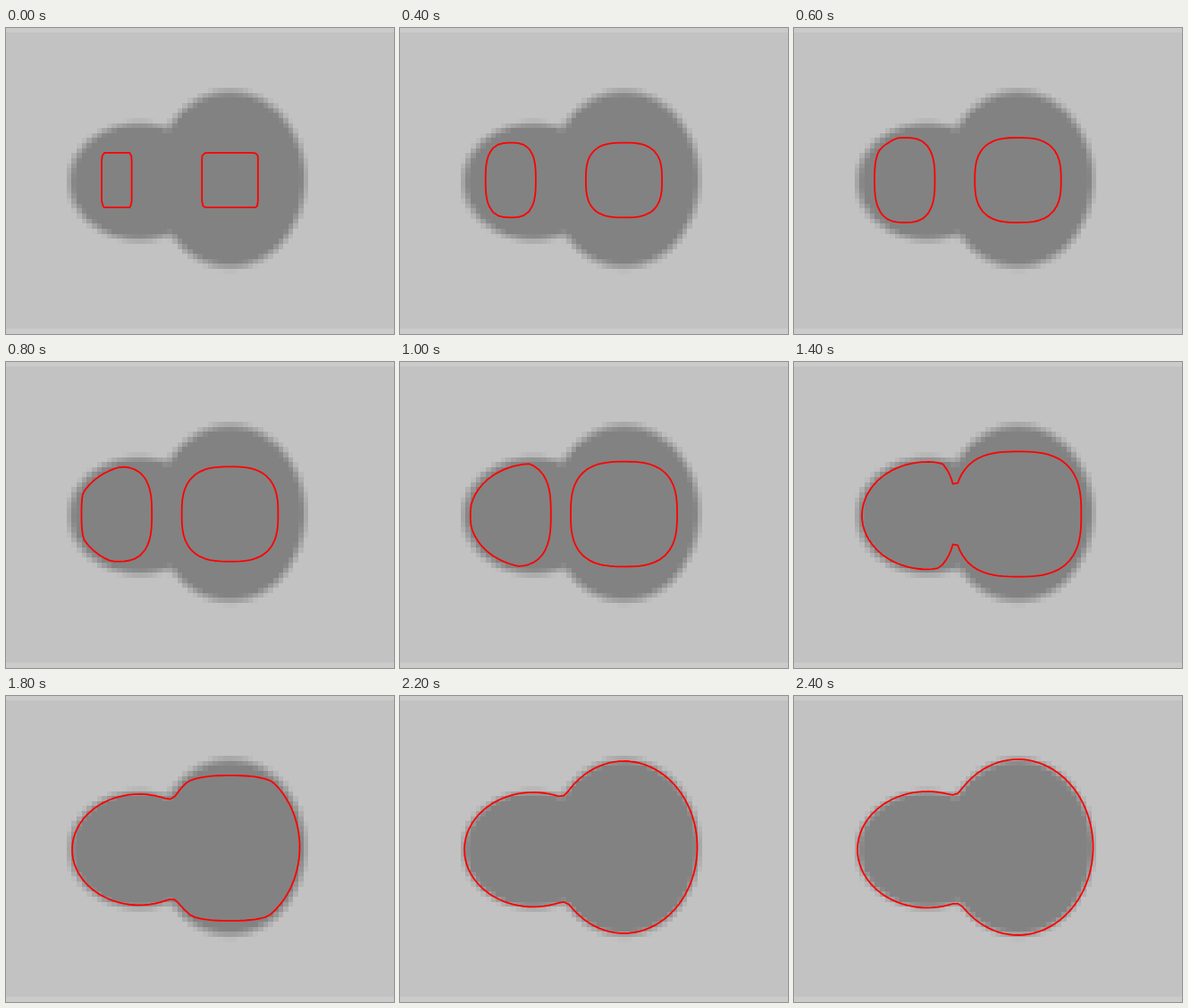
Animation of 434x343 px, one loop 2.6 s. Source, as an HTML page with a canvas:

```html
<!DOCTYPE html>
<html lang="en">
<head>
<meta charset="utf-8">
<title>Growing contours</title>
<style>
html, body { margin: 0; width: 100%; height: 100%; overflow: hidden; background: #cbcbcb; }
canvas, svg { position: absolute; left: 0; top: 0; width: 434px; height: 343px; }
path { fill: none; stroke: #f00; stroke-width: 1.8; stroke-linecap: round; }
</style>
</head>
<body>
<canvas id="backdrop" width="434" height="343"></canvas>
<svg viewBox="0 0 434 343"><path id="outline"/></svg>
<script>
const STEP = 200, STEPS = 13, LAST = STEPS - 1;
const CELL = 5.64, TOP = 5, COLS = 77, ROWS = 59;

// The ellipses of the grey shape; pace is how fast the contour closes in on each edge
const bodies = [
  { cx: 149, cy: 172.2, rx: 78, ry: 65.2, pace: 1 },
  { cx: 250.5, cy: 169.5, rx: 84, ry: 98.5, pace: 2 }
];
// The rectangles the contours start from
const seeds = [
  { cx: 123.8, cy: 170.5, rx: 16.8, ry: 30.6 },
  { cx: 250.5, cy: 170.5, rx: 31.3, ry: 30.6 }
];

const gridX = i => (i + 0.5) * CELL;
const gridY = j => TOP + (j + 0.5) * CELL;

// Signed distance, roughly: below zero inside a superellipse enlarged by grow
function superellipse(x, y, s, grow, power) {
  const rx = s.rx + grow, ry = s.ry + grow;
  const norm = (Math.abs((x - s.cx) / rx) ** power + Math.abs((y - s.cy) / ry) ** power) ** (1 / power);
  return (norm - 1) * Math.min(rx, ry);
}

// Union with a small fillet where the parts meet
function blend([a, b], k = 8) {
  const h = Math.max(k - Math.abs(a - b), 0) / k;
  return Math.min(a, b) - h * h * k / 4;
}

const shapeField = (x, y, left) => blend(bodies.map(b => superellipse(x, y, b, -b.pace * left, 2)));

// Seeds grow one cell per step, faster at the end, and stay inside the shape
function contourField(x, y, n) {
  const grow = CELL * (n + Math.max(0, n - 9));
  const power = 2.8 + 40 * 0.05 ** n;
  const grown = blend(seeds.map(s => superellipse(x, y, s, grow, power)));
  return Math.max(grown, shapeField(x, y, LAST - n));
}

function drawBackdrop() {
  const ctx = document.getElementById('backdrop').getContext('2d');
  ctx.fillStyle = '#c2c2c2';
  ctx.fillRect(0, TOP, 434, 332);
  for (let j = 0; j < ROWS; j++) {
    for (let i = 0; i < COLS; i++) {
      const cover = Math.min(1, 0.5 - shapeField(gridX(i), gridY(j), 0) / 10);
      if (cover <= 0) continue;
      const g = Math.round(194 - 64 * cover);
      const x = Math.round(i * CELL), y = Math.round(TOP + j * CELL);
      ctx.fillStyle = `rgb(${g},${g},${g})`;
      ctx.fillRect(x, y, Math.round((i + 1) * CELL) - x, Math.round(TOP + (j + 1) * CELL) - y);
    }
  }
}

// Zero line of the field on the cell grid, one short segment per crossed square
function outlineAt(n) {
  const field = Array.from({ length: ROWS }, (_, j) =>
    Array.from({ length: COLS }, (_, i) => contourField(gridX(i), gridY(j), n)));
  const corners = [[0, 0], [1, 0], [1, 1], [0, 1]];
  let d = '';
  for (let j = 0; j < ROWS - 1; j++) {
    for (let i = 0; i < COLS - 1; i++) {
      const cuts = [];
      corners.forEach(([ax, ay], c) => {
        const [bx, by] = corners[(c + 1) % 4];
        const a = field[j + ay][i + ax], b = field[j + by][i + bx];
        if (a < 0 === b < 0) return;
        const t = a / (a - b);
        cuts.push(gridX(i + ax + (bx - ax) * t).toFixed(2) + ',' + gridY(j + ay + (by - ay) * t).toFixed(2));
      });
      for (let c = 0; c < cuts.length; c += 2) d += `M${cuts[c]}L${cuts[c + 1]}`;
    }
  }
  return d;
}

drawBackdrop();
const outline = document.getElementById('outline');
const outlines = Array.from({ length: STEPS }, (_, n) => outlineAt(n));
let shown = -1;

function render(ms) {
  const n = Math.floor(ms / STEP) % STEPS;
  if (n !== shown) outline.setAttribute('d', outlines[n]);
  shown = n;
}

render(0);
const start = performance.now();
requestAnimationFrame(function tick() {
  render(performance.now() - start);
  requestAnimationFrame(tick);
});
</script>
</body>
</html>
```
